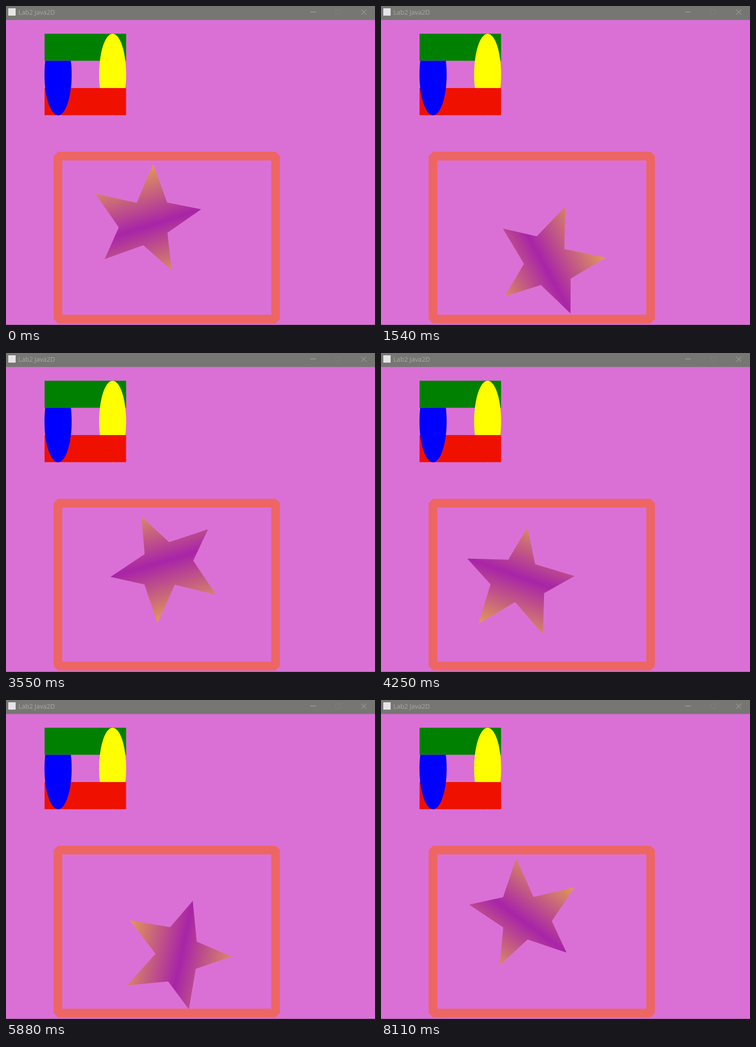
Animation, 804 px wide and 696 px high, one loop 8180 ms. Source, as an HTML page with a canvas:

```html
<!DOCTYPE html>
<html lang="en">
<head>
<meta charset="utf-8">
<title>Lab2 Java2D</title>
<style>
  html, body { margin: 0; width: 100%; height: 100%; overflow: hidden; background: #da70d6; }
  canvas { display: block; }
</style>
</head>
<body>
<canvas id="stage" width="804" height="696"></canvas>
<script>
const ctx = document.getElementById('stage').getContext('2d');
const RAD = Math.PI / 180;
const LOOP = 8180;
const STEP = 77.24;      // ms between picture changes
const LEAD = 8;          // the first picture is this much shorter
const LAST = 105;

const HALF_STAR = [[0, -95], [25, -30], [100, -20], [50, 20], [60, 95], [0, 45]];
const STAR = HALF_STAR.concat(HALF_STAR.slice(1, -1).reverse().map(([x, y]) => [-x, y]));

function rect(color, x, y, w, h) {
  ctx.fillStyle = color;
  ctx.fillRect(x, y, w, h);
}

function ellipse(color, x, y, rx, ry) {
  ctx.fillStyle = color;
  ctx.beginPath();
  ctx.ellipse(x, y, rx, ry, 0, 0, 2 * Math.PI);
  ctx.fill();
}

function line(x0, y0, x1, y1) {
  ctx.beginPath();
  ctx.moveTo(x0, y0);
  ctx.lineTo(x1, y1);
  ctx.stroke();
}

function drawTitleBar() {
  rect('#767673', 0, 0, 804, 30.5);
  rect('#e6e4e6', 5, 5, 16, 16);
  ctx.fillStyle = '#a9a9a7';
  ctx.font = '14px "Open Sans", "Noto Sans", sans-serif';
  ctx.fillText('Lab2 Java2D', 27, 19);
  ctx.lineWidth = 1;
  ctx.strokeStyle = '#b4b4b2';
  line(663, 13, 675, 13);
  line(774, 8, 785, 19);
  line(785, 8, 774, 19);
  ctx.strokeStyle = '#80807e';
  ctx.strokeRect(718.5, 8.5, 10, 10);
}

function drawBlocks() {
  rect('#008000', 84, 60.5, 177.6, 59);
  ellipse('#ffff00', 232.3, 149.5, 29.4, 89);
  rect('#f01000', 84, 179, 177.6, 59.2);
  // the blue oval lies over red but under green
  ctx.save();
  ctx.beginPath();
  ctx.rect(80, 119.5, 70, 125);
  ctx.clip();
  ellipse('#0000ff', 113.4, 149.5, 29.6, 89);
  ctx.restore();
}

function drawBorder() {
  ctx.strokeStyle = '#ed6663';
  ctx.lineWidth = 18.8;
  ctx.lineJoin = 'bevel';
  ctx.strokeRect(113.2, 327.5, 474.2, 355.5);
}

function starPaint() {
  const dx = Math.cos(100 * RAD), dy = Math.sin(100 * RAD);
  const mid = -2.6, reach = 101.5;
  const paint = ctx.createLinearGradient(
    dx * (mid - reach), dy * (mid - reach), dx * (mid + reach), dy * (mid + reach));
  paint.addColorStop(0, '#e0945c');
  paint.addColorStop(0.5, '#a824a8');
  paint.addColorStop(1, '#e0945c');
  return paint;
}

// The star turns clockwise while its centre circles the other way.
function drawStar(step) {
  const orbit = (219.4 - 6.867 * step) * RAD;
  const spin = (3.939 * step - 207.3) * RAD;
  ctx.save();
  ctx.translate(350.4 + 53.3 * Math.cos(orbit), 510.7 + 53.3 * Math.sin(orbit));
  ctx.rotate(spin);
  ctx.scale(1.184, 1.184);
  ctx.beginPath();
  STAR.forEach(([x, y]) => ctx.lineTo(x, y));
  ctx.closePath();
  ctx.fillStyle = starPaint();
  ctx.fill();
  ctx.restore();
}

function draw(t) {
  rect('#da70d6', 0, 0, 804, 696);
  drawTitleBar();
  drawBlocks();
  drawBorder();
  drawStar(Math.min(LAST, Math.floor((t + LEAD) / STEP)));
  rect('#8c5f8a', 0, 695, 804, 1);
}

let start = null;
function tick(now) {
  if (start === null) start = now;
  draw((now - start) % LOOP);
  requestAnimationFrame(tick);
}
draw(0);
requestAnimationFrame(tick);
</script>
</body>
</html>
```
